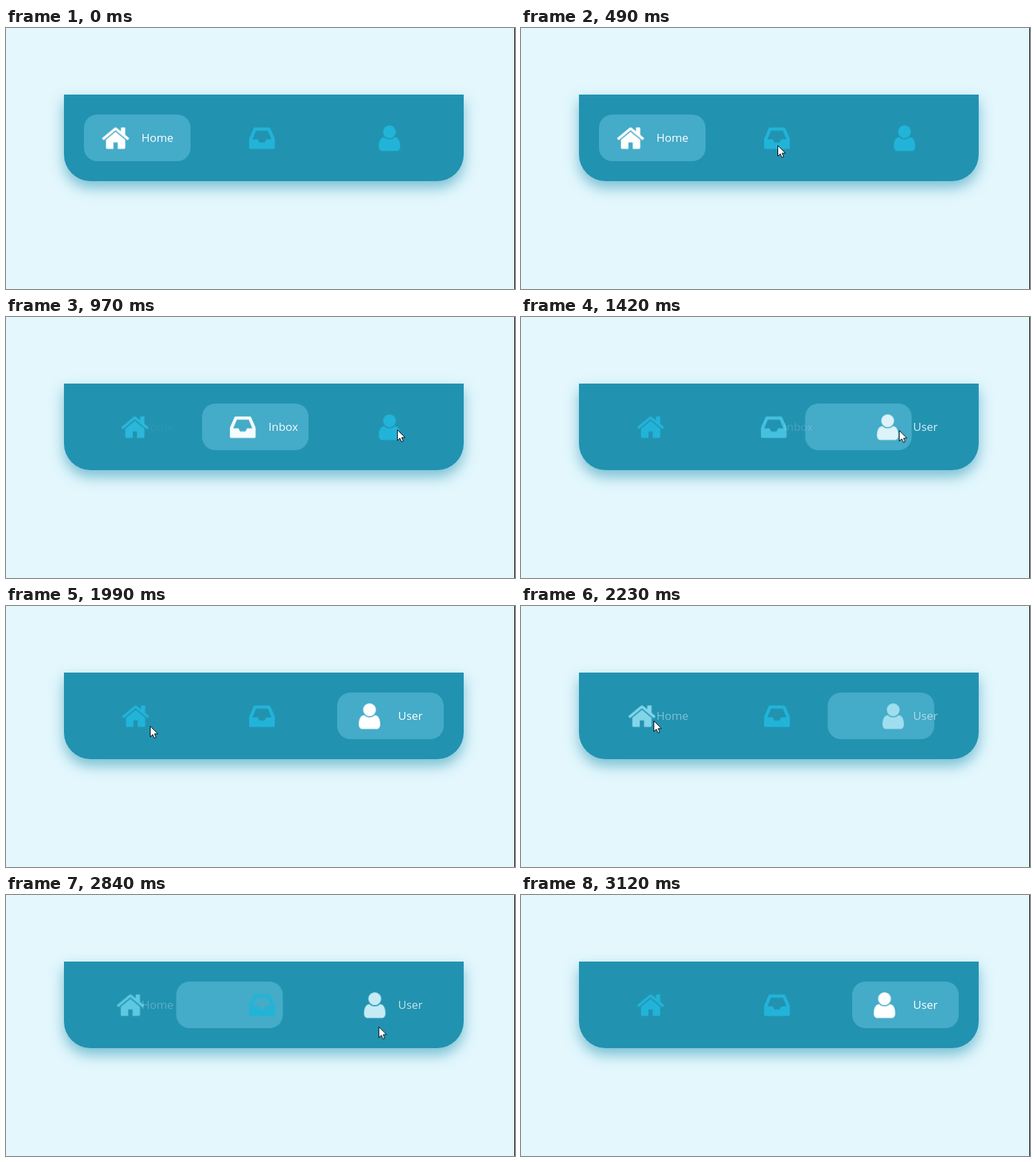
These frames come from a looping animation (764x392 px, 3610 ms). An HTML page:

```html
<!DOCTYPE html>
<html lang="en">
<head>
<meta charset="utf-8">
<title>Tab bar</title>
<style>
  html, body { margin: 0; width: 100%; height: 100%; overflow: hidden; background: #e3f7fd; }
  .bar {
    position: absolute; left: 87px; top: 100px; width: 600px; height: 130px;
    border-radius: 0 0 40px 40px; background: #2292b1;
    box-shadow: 0 10px 20px rgba(34, 146, 177, .55);
  }
  svg { position: absolute; left: 0; top: 0; }
  text { font: 17px "Open Sans", "Noto Sans", sans-serif; fill: #fff; }
  .icon { fill: #22b4d8; }
</style>
</head>
<body>
<div class="bar"></div>
<svg width="764" height="392" viewBox="0 0 764 392">
  <rect id="pill" y="130" width="160" height="70" rx="20" fill="#44abc8"/>

  <g class="icon"><g transform="scale(.0251) translate(-896 -896)">
    <path d="M320 986L896 512l576 474v486a64 64 0 0 1-64 64h-384v-384H768v384H384a64 64 0 0 1-64-64z"/>
    <path d="M1695 923l-62 74q-20 18-45 4L896 424 204 1001q-25 14-45-4L97 923q-12-25 4-45L820 279q76-52 152 0l244 204V288q0-32 32-32h192q32 0 32 32v408l219 182q16 20 4 45z"/>
  </g></g>
  <g class="icon"><g transform="scale(.0251) translate(-896 -896)">
    <path fill-rule="evenodd" d="M1151 960h316l-217-512H542L325 960h316l95 192h320zM1664 990v482a64 64 0 0 1-64 64H192a64 64 0 0 1-64-64V990q0-62 25-123L391 315q26-59 89-59h832q63 0 89 59l238 552q25 61 25 123z"/>
  </g></g>
  <g class="icon"><g transform="scale(.0251) translate(-896 -896)">
    <circle cx="896" cy="512" r="384"/>
    <path d="M256 1399C256 1030 380 832 583 832q131 128 313 128t313-128c203 0 327 198 327 567 0 146-94 265-213 265H469C350 1664 256 1545 256 1399z"/>
  </g></g>

  <text x="203.2" y="171">Home</text>
  <text x="394" y="171">Inbox</text>
  <text x="588.6" y="171">User</text>

  <path id="cursor" d="M.5 .5V16.5l3.7-3.5 2.5 5.5 2.6-1.1-2.4-5.4h5z" fill="#fff" stroke="#000"/>
  <rect x="763" width="1" height="392"/>
</svg>
<script>
const LOOP = 3610, SLIDE = 500;
const SLIDE_EASE = 'cubic-bezier(.645, .045, .355, 1)';

// [click time, tab chosen]
const clicks = [[595, 1], [1150, 2], [2100, 0], [2620, 2]];
const pillX = [117, 307, 497];
const iconX = [194.5, 384.2, 575.6];

// [time, x, y] of the pointer tip
const path = [
  [90, 464, 357], [450, 385, 176], [640, 385, 176], [930, 587, 169],
  [1000, 587, 169], [1130, 568, 170], [1620, 567, 170], [1990, 216, 180],
  [2070, 198, 172], [2220, 198, 172], [2540, 569, 171], [2760, 569, 171],
  [3070, 500, 359]
];

const move = (x, y) => `translate(${x}px, ${y}px)`;

function play(el, frames) {
  const keys = frames.map(({ at, ...rest }) => ({ offset: at / LOOP, ...rest }));
  el.animate(keys, { duration: LOOP, iterations: Infinity });
}

// Turns the clicks into keyframes; look(tab) gives the style while that tab is chosen.
function follow(el, look, easing) {
  const frames = [{ at: 0, ...look(0) }];
  let tab = 0;
  for (const [at, next] of clicks) {
    frames.push({ at, ...look(tab), easing }, { at: at + SLIDE, ...look(next) });
    tab = next;
  }
  frames.push({ at: LOOP, ...look(tab) });
  play(el, frames);
}

const pill = document.getElementById('pill');
const cursor = document.getElementById('cursor');

follow(pill, tab => ({ transform: move(pillX[tab], 0) }), SLIDE_EASE);

document.querySelectorAll('.icon').forEach((icon, i) =>
  follow(icon, tab => ({
    transform: move(iconX[i] - (tab === i ? 30 : 0), 165.5),
    fill: tab === i ? '#ffffff' : '#22b4d8'
  }), 'ease'));

document.querySelectorAll('text').forEach((label, i) =>
  follow(label, tab => ({ opacity: tab === i ? 1 : 0 }), 'ease'));

const spots = path.map(([at, x, y]) => ({ at, transform: move(x, y), easing: 'ease-in-out' }));
play(cursor, [{ ...spots[0], at: 0 }, ...spots, { ...spots[spots.length - 1], at: LOOP }]);

const hold = 'steps(1, end)';
play(cursor, [
  { at: 0, opacity: 0, easing: hold },
  { at: path[0][0], opacity: 1, easing: hold },
  { at: path[path.length - 1][0], opacity: 0, easing: hold },
  { at: LOOP, opacity: 0 }
]);
</script>
</body>
</html>
```
